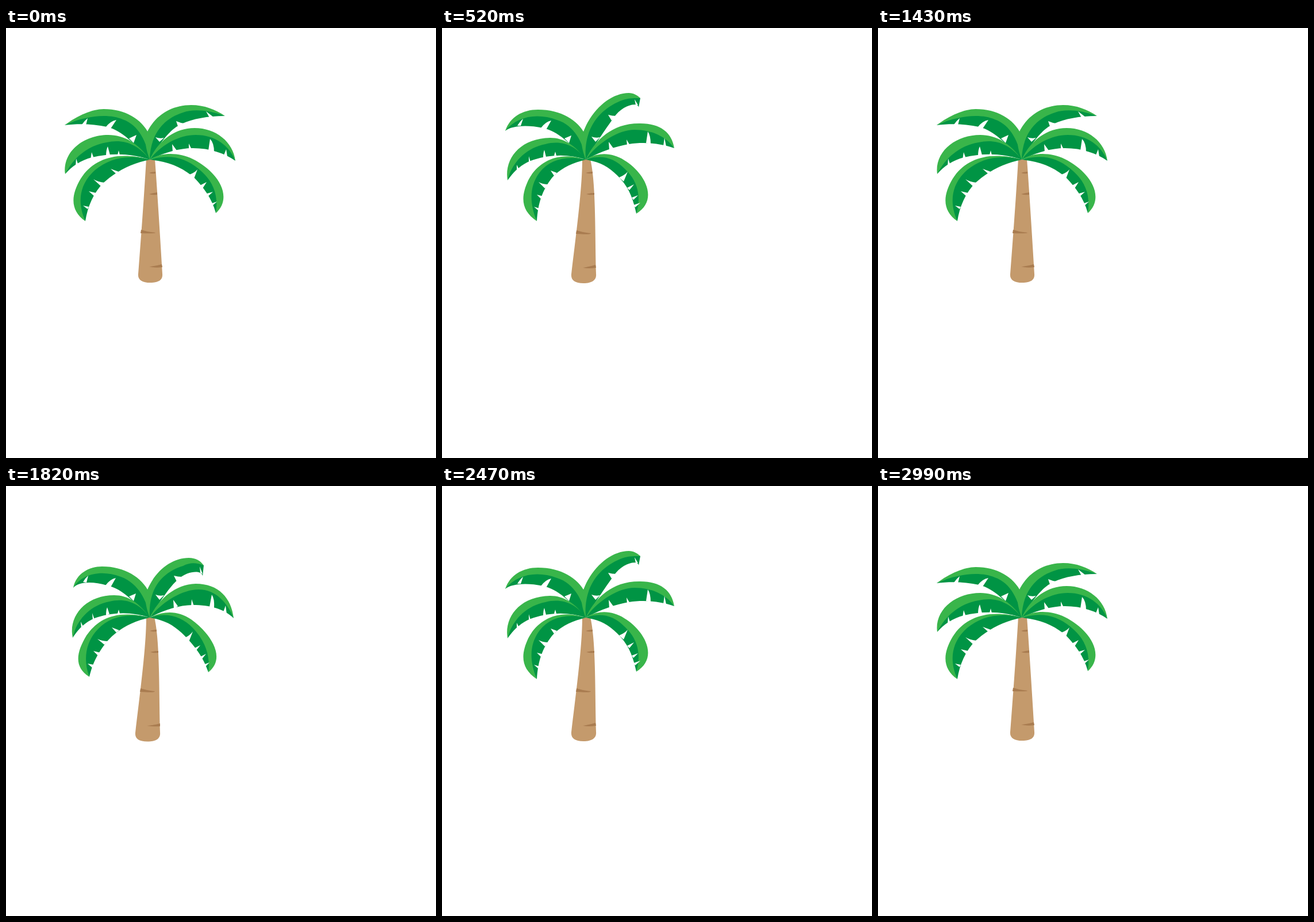
Recreate the animation shown at these times as an HTML page without scripts. Size 748 by 748 pixels, loop 3120 ms.

```html
<!DOCTYPE html>
<html lang="en">
<head>
<meta charset="utf-8">
<title>Palm tree</title>
<style>
html, body { margin: 0; width: 100%; height: 100%; overflow: hidden; background: #fff; }
svg { display: block; width: 100%; height: 100%; }
path { d: var(--a); animation: sway 780ms step-end infinite; }
.trunk { fill: #c49a6c; }
.bark { fill: #a97c50; }
.dark { fill: #009444; }
.light { fill: #39b54a; }
.cut { fill: #fff; }
/* --a rest, --b first gust, --c second gust; easing back passes one midpoint */
@keyframes sway {
  0%, 83.33%, 100% { d: var(--a); }
  16.66%, 66.66% { d: var(--b); }
  33.33% { d: var(--c); animation-timing-function: steps(2); }
}
</style>
</head>
<body>
<svg viewBox="0 0 748 748">
  <g id="stem">
    <path class="trunk" style="
      --a:path('M244 228C240 296 235 362 230 428C229 438 237 443 251 443C266 443 273 438 272 428C268 362 264 296 259 228Z');
      --b:path('M244 228C244 280 233 360 225 428C224 438 230 444 246 444C262 444 269 438 268 428C266 360 268 270 258 228Z');
      --c:path('M244 228C244 280 233 360 225 429C224 439 230 444.5 246 444.5C262 444.5 269 439 268 429C266 360 268 270 258 228Z')"/>
    <path class="bark" style="
      --a:path('M249 252Q255 250 260 250L260 253Q254 254 249 252ZM249 289Q256 287 263 286L263 290Q256 291 249 289ZM235 351Q247 355 260 356Q260 358 234 357ZM249 415Q261 414 271 411L272 416Q260 418 249 415Z');
      --b:path('M250 252Q256 250 262 250L262 253Q256 254 250 252ZM251 289Q258 287 265 287L265 290Q258 291 251 289ZM234 352Q246 356 259 357Q259 360 233 358ZM245 417Q257 415 267 412L268 417Q256 419 245 417Z');
      --c:path('M250 252Q256 250 262 250L262 253Q256 254 250 252ZM251 289Q258 287 265 287L265 290Q258 291 251 289ZM234 352Q246 356 259 357Q259 360 233 358ZM245 417Q257 416 268 413L268 418Q256 419 245 417Z')"/>
  </g>

  <g id="top-left">
    <path class="dark" style="
      --a:path('M250 229C247 198 234 165 203 156C180 146 140 149 102 169C128 166 152 167 176 172C203 179 222 201 250 229Z');
      --b:path('M250 229C248 198 232 165 200 157C165 144 129 151 110 179C121 170 147 168 176 174C203 180 222 201 250 229Z');
      --c:path('M250 229C248 198 232 165 200 155C165 142 131 150 117 177C126 167 149 165 176 173C203 179 222 201 250 229Z')"/>
    <path class="light" style="
      --a:path('M102 169C125 152 150 141 170 141C207 141 236 158 249 185L250 229C245 200 232 169 203 159C180 149 142 151 102 169Z');
      --b:path('M110 179C118 155 140 142 167 142C207 142 236 160 249 185L250 229C246 200 230 169 200 160C165 147 130 154 110 179Z');
      --c:path('M117 177C122 152 145 140 167 140C207 140 236 159 249 185L250 229C246 200 230 169 200 158C165 145 132 153 117 177Z')"/>
    <path class="cut" style="
      --a:path('M132 168Q137 161 142 157L139 169ZM173 173Q181 162 192 160L182 175ZM214 192L227 186L222 200Z');
      --b:path('M131 170Q136 162 141 158L137 170ZM172 174Q180 163 190 161L181 177ZM213 192L225 187L221 200Z');
      --c:path('M134 167Q138 160 143 156L140 168ZM173 173Q181 162 191 160L182 176ZM214 192L226 187L222 200Z')"/>
  </g>

  <g id="top-right">
    <path class="dark" style="
      --a:path('M250 229C248 186 268 156 306 143C325 138 350 140 381 153L381 153C350 153 325 158 305 167C287 176 275 190 250 229Z');
      --b:path('M250 229C243 174 269 141 308 124C325 118 335 120 345 122L342 138C342 128 313 133 298 157C286 174 276 188 250 229Z');
      --c:path('M250 229C244 176 269 148 306 136C320 130 330 131 344 138L342 157C342 146 317 147 301 161C286 174 276 189 250 229Z')"/>
    <path class="light" style="
      --a:path('M250 229C241 205 241 190 247 178C262 150 290 134 322 134C345 134 365 142 381 153C350 142 325 141 308 147C272 158 251 187 250 229Z');
      --b:path('M250 229C241 205 241 190 247 178C262 140 295 113 325 113C333 113 340 117 345 122C335 122 325 121 310 127C272 143 246 176 250 229Z');
      --c:path('M250 229C241 205 241 190 247 178C262 145 290 125 318 125C330 125 338 130 344 138C330 133 320 133 308 139C272 150 247 178 250 229Z')"/>
    <path class="cut" style="
      --a:path('M354 156L348 145L361 155ZM299 171L296 162Q303 165 310 166ZM267 198L260 190Q267 193 275 191Z');
      --b:path('M337 134L335 124L341 134ZM295 161L289 151Q296 153 303 153ZM267 198L260 189Q267 192 275 190Z');
      --c:path('M338 151L337 140L342 153ZM297 166L292 156Q299 158 306 158ZM267 198L260 189Q267 192 275 190Z')"/>
  </g>

  <g id="mid-left">
    <path class="dark" style="
      --a:path('M250 229C229 197 202 190 175 196C139 202 114 224 103 254C115 240 130 230 150 225C180 218 215 217 250 229Z');
      --b:path('M250 229C233 200 207 192 180 199C144 206 119 231 114 265C125 249 140 235 160 229C190 220 220 219 250 229Z');
      --c:path('M250 229C233 200 207 191 180 198C144 205 120 230 116 264C126 248 140 234 160 228C190 219 220 219 250 229Z')"/>
    <path class="light" style="
      --a:path('M103 254C98 215 135 186 178 186C205 186 230 200 250 229C228 200 202 193 175 199C140 205 117 227 103 254Z');
      --b:path('M114 265C108 228 135 192 188 191C212 191 232 204 250 229C232 203 207 195 180 202C145 209 122 234 114 265Z');
      --c:path('M116 264C108 225 140 190 188 190C212 190 232 203 250 229C232 203 207 194 180 201C145 208 123 233 116 264Z')"/>
    <path class="cut" style="
      --a:path('M121 242L122 227L126 239ZM147 229L149 216L153 227ZM174 223Q174 212 177 206L181 221ZM194 221L196 213L198 221Z');
      --b:path('M130 249L130 238L134 246ZM151 235L151 223L154 233ZM176 226Q176 217 178 212L181 224ZM195 222L197 215L199 222Z');
      --c:path('M131 248L130 236L134 244ZM151 234L150 221L154 232ZM174 225Q174 216 176 211L180 223ZM194 222L196 215L198 222Z')"/>
  </g>

  <g id="mid-right">
    <path class="dark" style="
      --a:path('M250 229C268 201 300 182 330 182C365 182 390 202 399 231C380 218 355 209 325 209C300 209 272 218 250 229Z');
      --b:path('M250 229C268 200 305 173 335 173C365 173 391 187 404 209C385 202 355 197 325 202C300 206 272 217 250 229Z');
      --c:path('M250 229C268 202 305 176 335 176C365 176 387 200 396 230C380 214 355 207 325 207C300 207 272 217 250 229Z')"/>
    <path class="light" style="
      --a:path('M250 229C262 201 290 174 328 174C365 174 395 198 399 231C388 205 365 186 330 186C300 186 269 204 250 229Z');
      --b:path('M250 229C262 203 290 165 345 166C380 166 400 182 404 209C390 189 365 177 335 177C305 177 269 202 250 229Z');
      --c:path('M250 229C262 203 290 171 330 170C370 170 392 195 396 230C385 203 365 180 335 180C305 180 269 204 250 229Z')"/>
    <path class="cut" style="
      --a:path('M290 216L289 202L297 213ZM318 211L318 201L323 211ZM352 213L355 193Q362 200 362 216ZM379 221L383 211L385 224Z');
      --b:path('M291 213L290 198L298 209ZM322 205L321 194L327 204ZM355 200L358 180Q363 187 363 202ZM385 205L387 191L390 206Z');
      --c:path('M292 214L291 198L299 209ZM322 209L323 197L327 209ZM354 210L358 189Q363 196 362 213ZM378 219L382 208L384 223Z')"/>
  </g>

  <g id="low-left">
    <path class="dark" style="
      --a:path('M250 229C209 217 176 224 152 244C126 267 118 300 138 336C142 311 152 286 171 268C196 246 221 235 250 229Z');
      --b:path('M250 229C213 219 184 227 167 249C150 270 146 300 165 336C167 305 174 283 191 261C206 244 226 235 250 229Z');
      --c:path('M250 229C209 218 177 226 157 246C136 268 129 300 145 332C150 312 157 293 177 269C196 248 221 235 250 229Z')"/>
    <path class="light" style="
      --a:path('M250 229C190 212 150 230 130 262C112 292 112 318 138 336C122 300 130 269 155 247C180 227 210 219 250 229Z');
      --b:path('M250 229C200 212 165 235 150 265C136 295 138 318 165 336C150 300 154 272 170 251C187 230 214 221 250 229Z');
      --c:path('M250 229C190 214 160 232 140 260C122 290 118 315 145 332C133 300 140 269 160 249C180 228 210 220 250 229Z')"/>
    <path class="cut" style="
      --a:path('M144 311L134 309L142 315ZM157 287L144 284L153 292ZM172 269Q160 268 152 263L165 275ZM196 250L182 245L191 253Z');
      --b:path('M170 314L160 311L168 318ZM177 293L165 290L173 298ZM185 272Q175 272 168 268L179 279ZM200 252L189 248L195 257Z');
      --c:path('M153 311L142 309L150 316ZM164 290L152 287L160 295ZM178 270Q167 270 159 266L171 276ZM197 251L184 246L192 255Z')"/>
  </g>

  <g id="low-right">
    <path class="dark" style="
      --a:path('M250 229C283 217 313 222 337 243C364 263 374 290 365 322C358 295 342 276 328 261C308 243 283 232 250 229Z');
      --b:path('M250 229C276 217 302 223 320 243C349 269 349 300 338 323C333 300 327 281 311 263C293 243 278 233 250 229Z');
      --c:path('M250 229C278 217 307 223 327 245C354 273 359 300 352 324C343 298 332 284 316 266C296 244 278 233 250 229Z')"/>
    <path class="light" style="
      --a:path('M250 229C270 216 300 216 325 228C369 250 396 294 365 322C370 290 360 265 335 245C311 225 284 219 250 229Z');
      --b:path('M250 229C270 216 295 216 317 230C351 250 379 298 338 323C345 300 345 270 318 245C300 226 276 219 250 229Z');
      --c:path('M250 229C275 216 300 217 322 232C354 255 385 298 352 324C355 300 350 273 325 247C305 226 278 219 250 229Z')"/>
    <path class="cut" style="
      --a:path('M319 255Q328 252 333 246L327 262ZM337 274L349 268L342 279ZM346 289L360 285L350 294ZM355 306L367 302L358 310Z');
      --b:path('M308 260Q318 256 323 250L316 267ZM322 278L334 272L326 282ZM330 295L341 291L333 299ZM333 308L345 304L336 312Z');
      --c:path('M311 264Q320 260 325 253L318 271ZM326 283L338 277L330 287ZM336 298L348 292L340 302ZM343 311L354 307L346 315Z')"/>
  </g>
</svg>
</body>
</html>
```
